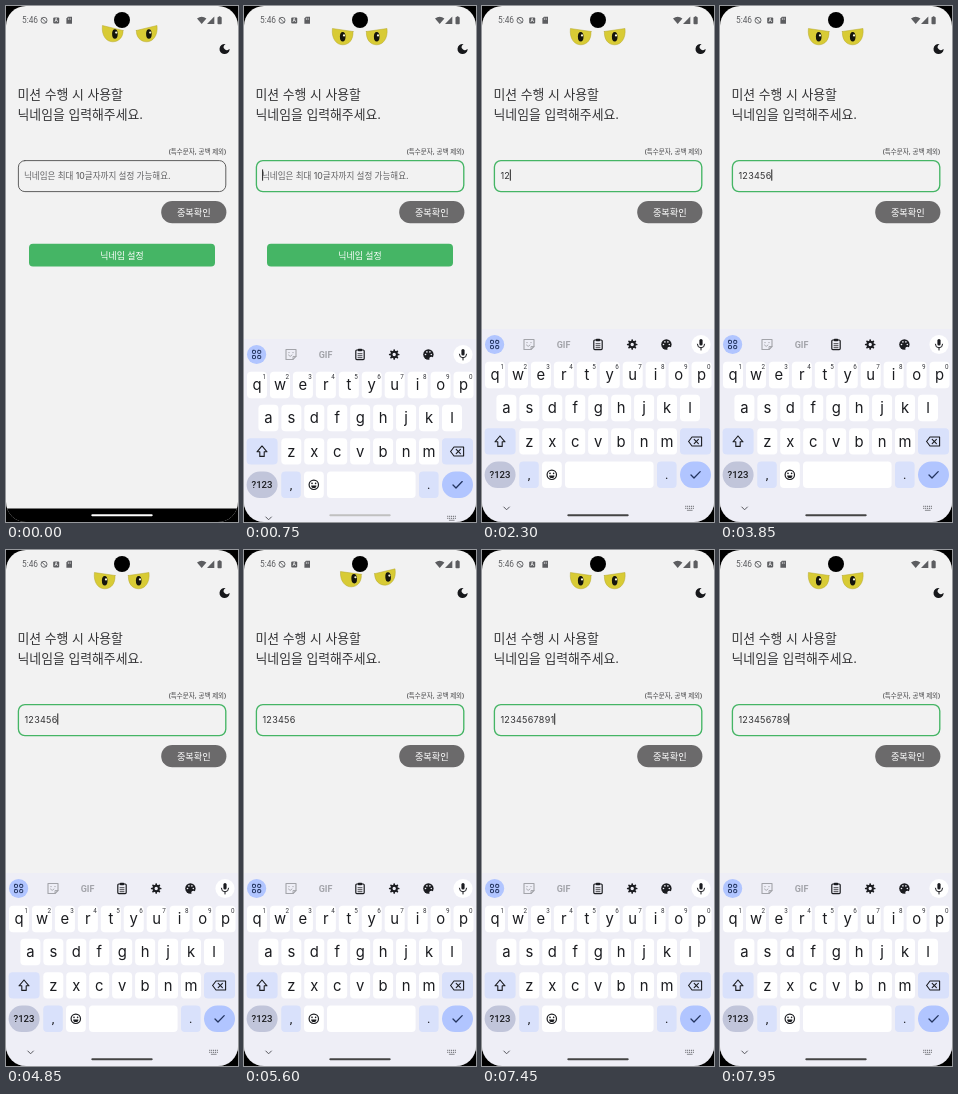
Write an HTML page with a canvas that moves like this. It is 232x516 px and loops after 8000 ms.

```html
<!DOCTYPE html>
<html lang="ko">
<head>
<meta charset="utf-8">
<style>
html, body { margin: 0; width: 100%; height: 100%; overflow: hidden; background: #000; }
canvas { display: block; width: 232px; height: 516px; }
</style>
</head>
<body>
<canvas id="stage"></canvas>
<script>
const W = 232, H = 516, LOOP = 8000;
const KR = 'Inter, "Noto Sans CJK KR", "Noto Sans CJK", sans-serif';
const LATIN = 'Roboto, sans-serif';
const KEYS = 'Inter, sans-serif';
const INK = '#1b1c20', GREEN = '#45b565', RED = '#ea4335', BG = '#f2f2f2';
const PALE = '#d9e1fb', BLUE = '#b1c5ff', PANEL = '#eeeef6';

const canvas = document.getElementById('stage');
const ctx = canvas.getContext('2d');
const dpr = window.devicePixelRatio || 1;
canvas.width = W * dpr;
canvas.height = H * dpr;

const clamp = (v) => Math.min(1, Math.max(0, v));
const smooth = (v) => v * v * (3 - 2 * v);

function box(x, y, w, h, r, fill) {
  ctx.beginPath();
  ctx.roundRect(x, y, w, h, r);
  if (fill) { ctx.fillStyle = fill; ctx.fill(); }
}

function outline(color, width) {
  ctx.strokeStyle = color;
  ctx.lineWidth = width;
  ctx.stroke();
}

function disc(x, y, r, fill) {
  ctx.beginPath();
  ctx.arc(x, y, r, 0, 7);
  ctx.fillStyle = fill;
  ctx.fill();
}

function ring(x, y, r, color, width = 1) {
  ctx.beginPath();
  ctx.arc(x, y, r, 0, 7);
  outline(color, width);
}

function trace(points) {
  ctx.beginPath();
  points.forEach(([x, y], i) => i ? ctx.lineTo(x, y) : ctx.moveTo(x, y));
}

function line(points, color, width = 1) {
  trace(points);
  ctx.lineCap = ctx.lineJoin = 'round';
  outline(color, width);
}

function poly(points, fill) {
  trace(points);
  ctx.closePath();
  ctx.fillStyle = fill;
  ctx.fill();
}

function label(str, x, y, size, color, { font = KR, weight = 400, align = 'left', spacing = 0 } = {}) {
  ctx.font = `${weight} ${size}px ${font}`;
  ctx.fillStyle = color;
  ctx.textAlign = align;
  ctx.textBaseline = 'alphabetic';
  ctx.letterSpacing = spacing + 'px';
  ctx.fillText(str, x, y);
  const width = ctx.measureText(str).width;
  ctx.letterSpacing = '0px';
  return width;
}

// ---------- input timeline: [time, value] ----------
const EDITS = [
  [400, ''], [1900, '1'], [2150, '12'], [2600, '123'], [2950, '1234'],
  [3300, '12345'], [3650, '123456'], [5700, '1234567'], [5900, '12345678'],
  [6050, '123456789'], [6250, '1234567891'], [6400, '12345678910'],
  [7300, '1234567891'], [7550, '123456789'],
];

function inputAt(t) {
  const edit = EDITS.filter(([at]) => at <= t).pop();
  if (!edit) return { text: '', focus: false, caret: false, error: false };
  const [at, text] = edit;
  return {
    text, focus: true,
    caret: (t - at) % 1000 < 500,
    error: text.length === 1 || text.length > 10,
  };
}

// ---------- eyes ----------
// pose: shift x, shift y, tilt, outer lid, inner lid, gaze x, gaze y
const CALM = [0, 0, 0, -7.5, -4.5, 0, 0.8];
const GLARE = [8, -3, 0, -7.5, -2.5, 2.2, 1];
const TILT = [8.4, -2.8, -0.05, -7, -3.2, 3, 0.8];
const ASIDE = [0, 3, 0, -6.5, -4, -5, 0];
const EYE_PERIOD = 5700;
const EYE_KEYS = [
  [0, GLARE], [150, GLARE], [300, TILT], [420, TILT], [600, CALM], [800, CALM],
  [900, ASIDE], [1150, ASIDE], [1300, CALM], [5300, CALM], [5450, TILT],
  [5600, TILT], [EYE_PERIOD, GLARE],
];

function eyePose(t) {
  const p = t % EYE_PERIOD;
  const i = EYE_KEYS.findIndex(([at]) => at > p);
  const [t0, a] = EYE_KEYS[i - 1], [t1, b] = EYE_KEYS[i];
  const k = smooth((p - t0) / (t1 - t0));
  return a.map((v, j) => v + (b[j] - v) * k);
}

function eye(side, [, , , outer, inner, gx, gy]) {
  ctx.save();
  ctx.translate(side * 17, 0);
  ctx.beginPath();
  ctx.moveTo(-10.3 * side, inner);
  ctx.lineTo(10.3 * side, outer);
  ctx.bezierCurveTo(11.4 * side, 3, 6 * side, 8.8, 0, 8.8);
  ctx.bezierCurveTo(-6.5 * side, 8.8, -10.8 * side, 3.5, -10.3 * side, inner);
  ctx.closePath();
  ctx.fillStyle = '#d8cb35';
  ctx.fill();
  outline('#b5a72b', 0.5);
  ctx.clip();
  ctx.beginPath();
  ctx.ellipse(gx, gy, 2.8, 4.8, 0, 0, 7);
  ctx.fillStyle = '#14140c';
  ctx.fill();
  disc(gx + 1.3, gy - 1.4, 1.1, '#f7f5dc');
  ctx.restore();
}

function eyes(t) {
  const pose = eyePose(t);
  ctx.save();
  ctx.translate(115.7 + pose[0], 30 + pose[1]);
  ctx.rotate(pose[2]);
  eye(-1, pose);
  eye(1, pose);
  ctx.restore();
}

// ---------- page ----------
function statusBar() {
  const c = '#5c5d60';
  label('5:46', 16, 17.2, 8.3, c, { font: LATIN });
  ring(38, 14.3, 3, c, 0.9);
  line([[35.8, 12], [40.2, 16.6]], c, 0.9);
  box(47.2, 11.4, 6, 6, 1, c);
  label('A', 50.2, 16.3, 5, BG, { font: LATIN, weight: 700, align: 'center' });
  poly([[62, 10.8], [66, 10.8], [66, 17.8], [60.4, 17.8], [60.4, 12.5]], c);
  line([[62.4, 12.2], [62.4, 13.6]], BG, 0.6);
  line([[64.2, 12.2], [64.2, 13.6]], BG, 0.6);
  ctx.beginPath();
  ctx.moveTo(195.7, 18);
  ctx.lineTo(191, 12.4);
  ctx.quadraticCurveTo(195.7, 9, 200.4, 12.4);
  ctx.closePath();
  ctx.fillStyle = c;
  ctx.fill();
  poly([[208.3, 10.5], [208.3, 18], [201, 18]], c);
  box(211.5, 11, 4.2, 7.2, 0.8, c);
  box(212.7, 10.2, 1.8, 1.2, 0.2, c);
}

function moon() {
  ctx.beginPath();
  ctx.arc(218.6, 43, 5.1, -1.45, 0.1, true);
  ctx.arc(220.8, 41, 3.1, 0.7, 4.3);
  ctx.closePath();
  ctx.fillStyle = '#17181b';
  ctx.fill();
}

function field(input) {
  const accent = input.error ? RED : GREEN;
  box(12.4, 154.6, 207.4, 31, 6.5);
  outline(input.focus ? accent : '#505050', input.error ? 2.4 : input.focus ? 1.35 : 0.9);
  let x = 18.6;
  if (input.text) {
    x += label(input.text, 18.4, 173.3, 9.03, '#333335', { spacing: 0.28 });
  } else {
    label('닉네임은 최대 10글자까지 설정 가능해요.', 18, 173.2, 8.55, '#626264', { weight: 500 });
  }
  if (input.caret) line([[x, 163.8], [x, 174.3]], input.error ? RED : '#222', 1);
  if (input.error) label('2~10자 사이로 입력해주세요.', 18.3, 197.2, 7.2, RED, { weight: 500 });
}

function page(t, input) {
  box(0, 0, W, H, 0, BG);
  statusBar();
  eyes(t);
  disc(116, 14, 8, '#000');
  moon();
  label('미션 수행 시 사용할', 11.5, 93.4, 12.85, '#333335');
  label('닉네임을 입력해주세요.', 11.5, 112.7, 12.85, '#333335');
  label('(특수문자, 공백 제외)', 220.5, 147.6, 6.5, '#434345', { align: 'right', weight: 500 });
  field(input);
  const y = input.error ? 209 : 195;
  box(155.2, y, 65.2, 22.3, 11.1, '#6b6a6b');
  label('중복확인', 187.8, y + 14.6, 9.2, '#fff', { align: 'center' });
  if (t < 850) {
    box(23, 237.7, 186, 22.8, 4, GREEN);
    label('닉네임 설정', 116, 252.8, 8.9, '#fff', { align: 'center' });
  }
}

// ---------- keyboard, drawn at its resting place ----------
function toolbar() {
  const y = 338.5, gray = '#a3a4aa';
  disc(12.6, y, 9.6, BLUE);
  for (const dx of [-2.6, 2.6]) for (const dy of [-2.6, 2.6]) {
    box(11.1 + dx, y - 1.5 + dy, 3, 3, 0.6);
    outline('#23345f', 1);
  }
  line([[42, 333.5], [52, 333.5], [52, 340.5], [49, 343.5], [42, 343.5], [42, 333.5]], gray, 1.1);
  line([[49, 343.5], [49, 340.5], [52, 340.5]], gray, 0.9);
  line([[44.5, 339], [46.2, 340.4], [48, 339]], gray, 0.9);
  disc(45, 336.6, 0.7, gray);
  disc(49, 336.6, 0.7, gray);
  label('GIF', 81.5, 341.9, 9, gray, { font: LATIN, weight: 700, align: 'center' });
  box(111.8, 334, 8.4, 9.6, 1);
  outline(INK, 1.2);
  box(113.8, 332.7, 4.4, 2.6, 0.8, INK);
  for (const dy of [-0.8, 1.2, 3.2]) line([[114, y + dy], [118, y + dy]], INK, 0.8);
  for (let i = 0; i < 8; i++) {
    const a = i * Math.PI / 4, c = Math.cos(a), s = Math.sin(a);
    line([[150.2 + 3 * c, y + 3 * s], [150.2 + 4.5 * c, y + 4.5 * s]], INK, 1.7);
  }
  ring(150.2, y, 2.7, INK, 2);
  disc(184.4, y, 5.2, INK);
  [[-2.9, 0], [-1.5, -2.6], [1.5, -2.6], [2.9, 0]].forEach(([dx, dy]) => disc(184.4 + dx, y + dy, 0.8, PANEL));
  disc(187.3, 342.7, 2, PANEL);
  disc(219, y, 9.6, '#fff');
  box(217.4, 333, 3.2, 6.6, 1.6, INK);
  ctx.beginPath();
  ctx.arc(219, 338.2, 3.6, 0, Math.PI);
  outline(INK, 1);
  line([[219, 342], [219, 344]], INK, 1);
}

function keyRow(letters, x, y, digits) {
  [...letters].forEach((ch, i) => {
    const cx = x + i * 22.95;
    box(cx - 10, y - 13.2, 20, 26.4, 4, '#fff');
    label(ch, cx, y + 5.2, 14.8, INK, { font: KEYS, align: 'center' });
    if (digits) label(digits[i], cx + 7.2, y - 5.9, 6.3, '#3a3b41', { font: LATIN, align: 'center' });
  });
}

function bottomRow() {
  const y = 455.6, h = 26.4, cy = 468.8;
  box(2.6, y, 31, h, 13.2, '#c1c5da');
  label('?123', 18, cy + 3.5, 9.6, INK, { font: LATIN, weight: 500, align: 'center' });
  box(37.2, y, 19.6, h, 4, PALE);
  label(',', 47, cy + 4, 13, INK, { font: LATIN, align: 'center' });
  box(60, y, 19.8, h, 4, '#fff');
  ring(69.8, cy, 4.7, INK, 1.2);
  disc(68, cy - 1.4, 0.8, INK);
  disc(71.6, cy - 1.4, 0.8, INK);
  ctx.beginPath();
  ctx.arc(69.8, cy + 0.6, 2.6, 0, Math.PI);
  ctx.fill();
  box(83, y, 88.6, h, 4, '#fff');
  box(175, y, 19.6, h, 4, PALE);
  label('.', 184.8, cy + 4, 13, INK, { font: LATIN, align: 'center' });
  box(198, y, 31, h, 13.2, BLUE);
  line([[209, cy + 0.2], [212, cy + 3.2], [218.2, cy - 3.2]], '#23345f', 1.3);
}

function keyboard(dy) {
  ctx.save();
  ctx.translate(0, dy);
  box(0, 323, W, 200, 0, PANEL);
  toolbar();
  keyRow('qwertyuiop', 13, 369, '1234567890');
  keyRow('asdfghjkl', 24.4, 402);
  keyRow('zxcvbnm', 47.3, 435.4);
  box(2.6, 422.2, 31, 26.4, 4, PALE);
  line([[18, 430], [23, 435.8], [20.2, 435.8], [20.2, 440.4], [15.8, 440.4], [15.8, 435.8], [13, 435.8], [18, 430]], INK, 1.1);
  box(198, 422.2, 31, 26.4, 4, PALE);
  line([[206.6, 435.5], [210, 431], [219.6, 431], [219.6, 440], [210, 440], [206.6, 435.5]], INK, 1.1);
  line([[212.2, 433.4], [216.4, 437.6]], INK, 1.1);
  line([[216.4, 433.4], [212.2, 437.6]], INK, 1.1);
  bottomRow();
  line([[21.8, 501], [24.6, 503.8], [27.4, 501]], '#55565c', 1);
  for (const ky of [499.8, 501.8]) {
    for (let i = 0; i < 5; i++) box(203.2 + i * 1.9, ky, 1.1, 1.1, 0, '#7d7e84');
  }
  line([[205.3, 504.3], [210.2, 504.3]], '#7d7e84', 0.9);
  ctx.restore();
}

function homePill(t) {
  const k = clamp((t - 650) / 300);
  const shade = Math.round(255 - 187 * k);
  box(85.3, 508.2, 61.4, 2.1, 1, `rgb(${shade}, ${shade}, ${shade})`);
}

function draw(t) {
  ctx.setTransform(dpr, 0, 0, dpr, 0, 0);
  box(0, 0, W, H, 0, '#000');
  ctx.save();
  box(0, 0, W, H, 20);
  ctx.clip();
  page(t, inputAt(t));
  box(0, 502.5, W, 14, 0, '#000');
  const left = Math.pow(1 - clamp((t - 500) / 400), 3);
  if (left < 1) keyboard(left * 193);
  homePill(t);
  ctx.restore();
}

function tick() {
  draw(performance.now() % LOOP);
  requestAnimationFrame(tick);
}
tick();
</script>
</body>
</html>
```
